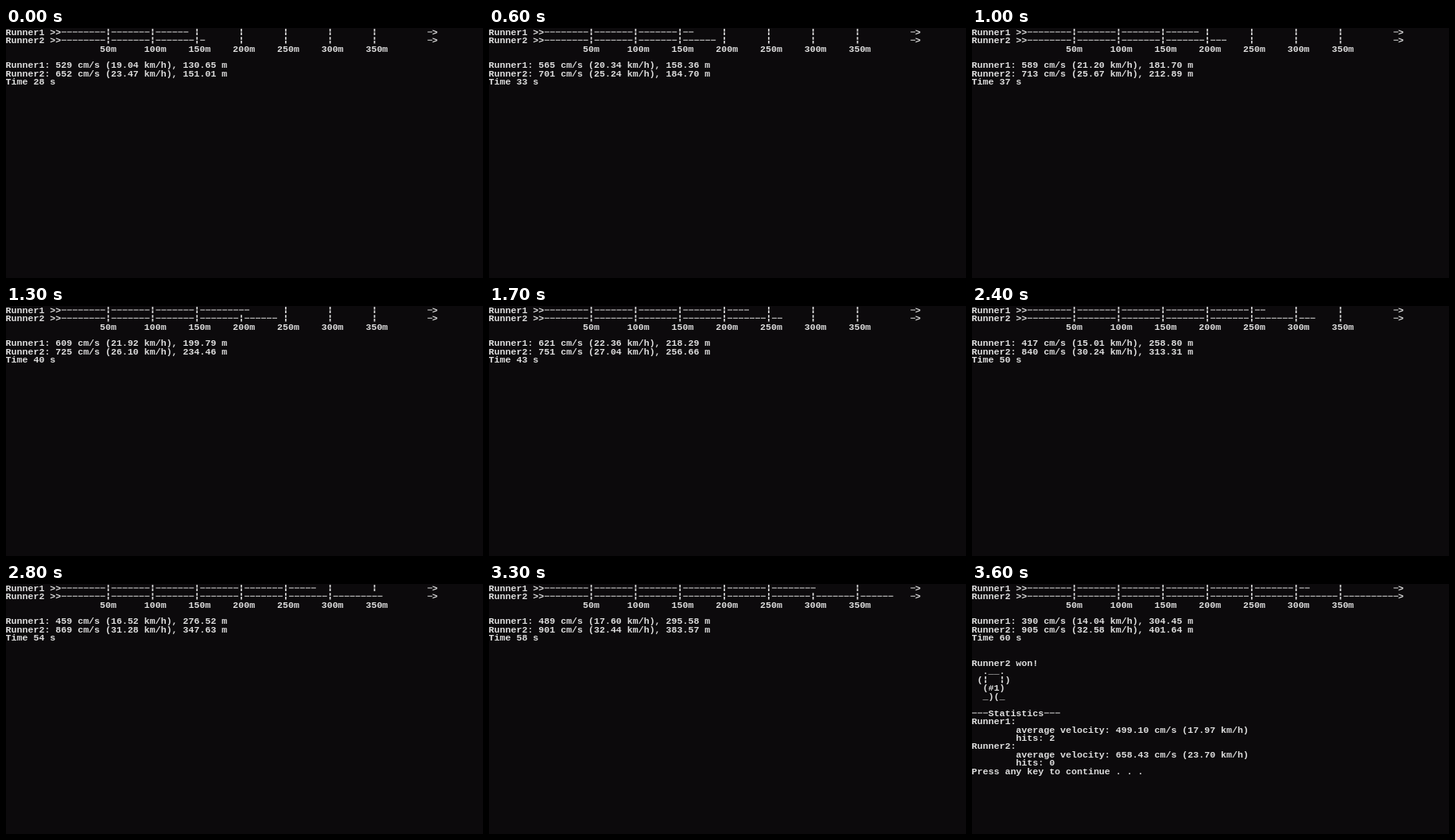
Write an HTML page that moves like this. It is 600x314 px and loops after 3.9 s.

```html
<!DOCTYPE html>
<html lang="en">
<head>
<meta charset="utf-8">
<title>Runner race</title>
<style>
  html, body { margin: 0; width: 100%; height: 100%; overflow: hidden; background: #0c0a0c; }
  svg { display: block; width: 600px; height: 314px; }
  text {
    font: bold 11.628px "Liberation Mono", "Courier New", monospace;
    fill: #dedede;
    white-space: pre;
  }
  path { fill: #dedede; }
</style>
</head>
<body>
<svg viewBox="0 0 600 314"><g id="text"></g><path id="strokes"/></svg>
<script>
const LOOP = 3900, TICK = 100, STATS_AT = 3600;
const START_TIME = 28, ROWS = 23;
const CELL_W = 600 / 86, CELL_H = CELL_W * 1.5;

// Distances in cm, speeds in cm/s for each second of the race
const runners = [
  { name: "Runner1", start: 13065, average: "499.10 cm/s (17.97 km/h)", hits: 2,
    speeds: [529, 541, 548, 556, 561, 565, 577, 582, 586, 589, 597, 603, 609, 613, 616, 621, 630,
      640, 646, 652, 660, 406, 417, 428, 438, 447, 459, 465, 472, 480, 489, 497, 390] },
  { name: "Runner2", start: 15101, average: "658.43 cm/s (23.70 km/h)", hits: 0,
    speeds: [652, 654, 663, 672, 679, 701, 701, 702, 703, 713, 714, 718, 725, 731, 738, 751, 771,
      785, 799, 814, 824, 832, 840, 847, 855, 861, 869, 893, 900, 900, 901, 902, 905] }
];

const group = document.getElementById("text");
const strokes = document.getElementById("strokes");
const lines = Array.from({ length: ROWS }, (_, row) => {
  const el = document.createElementNS("http://www.w3.org/2000/svg", "text");
  el.setAttribute("x", -0.4);
  el.setAttribute("y", row * CELL_H + 8.6);
  return group.appendChild(el);
});

function distance(runner, step) {
  let cm = runner.start;
  for (let i = 1; i <= step; i++) cm += runner.speeds[i];
  return cm / 100;
}

function track(runner, step) {
  const metres = distance(runner, step);
  const head = Math.floor(metres / 6.25 + 11.4);
  const cells = [...(runner.name + " >>").padEnd(76) + "->"];
  for (let col = 10; col < 76; col++) {
    const mark = (col - 10) / 8;
    const isMark = mark >= 1 && mark <= 7 && Number.isInteger(mark);
    const reached = col <= head;
    // A mark stays covered until its distance is really passed
    if (isMark && (!reached || metres >= mark * 50)) cells[col] = "|";
    else if (reached) cells[col] = "-";
  }
  return cells.join("");
}

function scale() {
  let line = "";
  for (let m = 50; m <= 350; m += 50) line = line.padEnd(9 + m / 50 * 8) + m + "m";
  return line;
}

function status(runner, step) {
  const v = runner.speeds[step];
  return `${runner.name}: ${v} cm/s (${(v * 0.036).toFixed(2)} km/h), ${distance(runner, step).toFixed(2)} m`;
}

function statistics() {
  const indent = " ".repeat(8);
  return [
    "", "", "Runner2 won!",
    "  .__.", " (|  |)", "  (#1)", "  _)(_", "",
    "---Statistics---",
    ...runners.flatMap(r => [
      r.name + ":",
      `${indent}average velocity: ${r.average}`,
      `${indent}hits: ${r.hits}`
    ]),
    "Press any key to continue . . ."
  ];
}

const box = (x, y, w, h) => `M${x.toFixed(2)} ${y.toFixed(2)}h${w}v${h}h${-w}z`;

function print(screen) {
  let d = "";
  lines.forEach((el, row) => {
    const line = screen[row] || "";
    el.textContent = line.replace(/[-|]/g, " ");
    [...line].forEach((ch, col) => {
      const x = col * CELL_W, y = row * CELL_H;
      if (ch === "-") d += box(x + 0.1, y + 4.4, 6, 1);
      if (ch === "|") d += box(x + 2.2, y + 0.9, 1.7, 3.5) + box(x + 2.2, y + 5.6, 1.7, 3.5);
    });
  });
  strokes.setAttribute("d", d);
}

function render(t) {
  const tick = Math.floor(t / TICK);
  const pauses = [2, 16, 29].filter(p => tick >= p).length;
  const step = Math.min(tick - pauses, runners[0].speeds.length - 1);
  const screen = [
    ...runners.map(r => track(r, step)),
    scale(), "",
    ...runners.map(r => status(r, step)),
    `Time ${START_TIME + step} s`
  ];
  if (t >= STATS_AT) screen.push(...statistics());
  print(screen);
}

const begin = performance.now();
function frame() {
  render((performance.now() - begin) % LOOP);
  requestAnimationFrame(frame);
}
frame();
</script>
</body>
</html>
```
